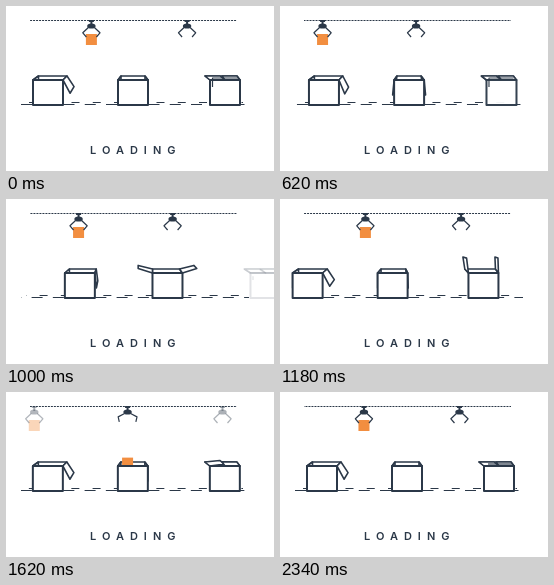
An HTML page with a canvas for the animation above (2360 ms loop, 268x165 px).

```html
<!DOCTYPE html>
<html lang="en">
<head>
<meta charset="utf-8">
<title>Loading</title>
<style>
  html, body { margin: 0; width: 100%; height: 100%; overflow: hidden; background: #fff; }
  canvas { position: absolute; left: 0; top: 0; width: 268px; height: 165px; }
  p {
    position: absolute; left: 84px; top: 136px; margin: 0;
    font: 600 11px/16px Inter, Lato, sans-serif;
    letter-spacing: 6px; white-space: nowrap; color: #2b3848;
  }
</style>
</head>
<body>
<canvas></canvas>
<p>LOADING</p>
<script>
const LOOP = 2360, CYCLE = LOOP / 2;
const INK = '#2b3848', ORANGE = '#f28e40';
const canvas = document.querySelector('canvas');
const ctx = canvas.getContext('2d');
const scale = window.devicePixelRatio || 1;
canvas.width = 268 * scale;
canvas.height = 165 * scale;

const clamp = v => Math.max(0, Math.min(1, v));
const mix = (a, b, u) => a + (b - a) * u;
const ramp = (t, a, b) => clamp((t - a) / (b - a));

// Piecewise linear value through [time, value] pairs
function track(t, keys) {
  let i = 1;
  while (i < keys.length - 1 && t > keys[i][0]) i++;
  const [t0, v0] = keys[i - 1], [t1, v1] = keys[i];
  return mix(v0, v1, ramp(t, t0, t1));
}

// cubic-bezier(.8, 0, .2, 1), solved by bisection
function glide(x) {
  if (x <= 0 || x >= 1) return clamp(x);
  let lo = 0, hi = 1, s;
  for (let i = 0; i < 24; i++) {
    s = (lo + hi) / 2;
    const r = 1 - s;
    if (2.4 * s * r * r + 0.6 * s * s * r + s * s * s < x) lo = s; else hi = s;
  }
  return s * s * (3 - 2 * s);
}

function shape(points, width, fill, closed = true) {
  ctx.beginPath();
  points.forEach(([x, y]) => ctx.lineTo(x, y));
  if (closed) ctx.closePath();
  if (fill) { ctx.fillStyle = fill; ctx.fill(); }
  ctx.lineWidth = width;
  ctx.stroke();
}

function dashes(x0, x1, y, width, pattern, shift) {
  ctx.setLineDash(pattern);
  ctx.lineDashOffset = -shift;
  shape([[x0, y], [x1, y]], width, null, false);
  ctx.setLineDash([]);
}

/* Boxes: each moves one slot to the right per loop */
const SLOT = [-58, 27, 112, 204, 312];
const BACK_LEFT = [8, 5.5, 3, -5, -8];
const BACK_RIGHT = [38, 34, 27, 27, 22];
const TOP = 74, BACK = 70, WIDE = 30, FLAP = 15;

// Flap angles in degrees: 90 hangs down, 0 points outwards, -180 is shut
const RIGHT = [
  [[0, 62], [LOOP, 62]],
  [[500, 62], [1000, 84], [1300, 90]],
  [[600, 90], [1000, -17], [1360, -166], [1640, -180]],
  [[0, -180], [LOOP, -180]]
];
const LEFT = [
  [[0, 90], [LOOP, 90]],
  [[0, 90], [LOOP, 90]],
  [[600, 90], [1000, -17], [1360, -148], [1700, -180]],
  [[0, -180], [LOOP, -180]]
];

function makeBox(k, t, e) {
  const at = list => mix(list[k], list[k + 1], e);
  return {
    x: at(SLOT), bl: at(BACK_LEFT), br: at(BACK_RIGHT),
    left: track(t, LEFT[k]), right: track(t, RIGHT[k]),
    tape: k === 3 ? 1 : k === 2 ? ramp(t, 1700, 2340) : 0,
    alpha: k === 0 ? clamp((e - 0.4) * 2.5) : k === 3 ? clamp(1 - 2.3 * e) : 1
  };
}

function flap(front, back, side, angle) {
  const a = angle * Math.PI / 180;
  const dx = side * FLAP * Math.cos(a), dy = FLAP * Math.sin(a);
  shape([[front, TOP], [back, BACK], [back + dx, BACK + dy * 0.8], [front + dx, TOP + dy]], 1.6, '#fff');
}

function drawLid(b) {
  ctx.globalAlpha = b.alpha;
  shape([[b.x, TOP], [b.x + b.bl, BACK], [b.x + b.br, BACK], [b.x + WIDE, TOP]], 1.6, '#fff');
  flap(b.x, b.x + b.bl, -1, b.left);
  flap(b.x + WIDE, b.x + b.br, 1, b.right);
}

function drawBody(b) {
  const { x } = b;
  ctx.globalAlpha = b.alpha;
  shape([[x, TOP], [x + WIDE, TOP], [x + WIDE, 99], [x, 99]], 2, '#fff');
  if (b.tape) {
    ctx.setLineDash([36 * b.tape, 60]);
    shape([[x + 29, 72], [x + 2.5, 72], [x + 2.5, 81]], 1.2, null, false);
    ctx.setLineDash([]);
  }
}

/* Claws: a new one enters every half loop */
const PATH = [[0, -7], [500, 33], [1000, 72.5], [1180, 85.3], [1360, 102.2],
  [1440, 107], [1800, 136], [2360, 181], [3540, 276]];
const DROP = CYCLE + 90;

function drawClaw(age, x) {
  const open = track(age, [[DROP - 20, 0], [DROP + 80, 1], [DROP + 260, 1], [DROP + 480, 0]]);
  ctx.globalAlpha = ramp(x, 25, 34) * (1 - ramp(x, 208, 222));
  ctx.fillStyle = INK;
  ctx.fillRect(x - 2.5, 14, 5, 2);
  ctx.fillRect(x - 1, 15, 2, 4);
  ctx.beginPath();
  ctx.ellipse(x, 20, 4.2, 2.6, 0, 0, 7);
  ctx.fill();
  for (const s of [-1, 1]) {
    shape([
      [x + s * 3, 21.5],
      [x + s * mix(8.6, 10, open), mix(26.8, 23.5, open)],
      [x + s * mix(5, 10.6, open), mix(31, 29, open)]
    ], 1.2, null, false);
  }
}

function drawBlock(age, x) {
  const d = Math.max(0, age - DROP);
  const y = 28 + 2e-4 * d * d + 3e-7 * d ** 3;
  if (y > 78) return;
  ctx.globalAlpha = ramp(x, 25, 34);
  ctx.fillStyle = ORANGE;
  ctx.fillRect(x - 5.5, y, 11, 11);
}

function draw(now) {
  const t = now % LOOP;
  const e = glide((t - 378) / 1317);
  ctx.setTransform(scale, 0, 0, scale, 0, 0);
  ctx.globalAlpha = 1;
  ctx.clearRect(0, 0, 268, 165);
  ctx.strokeStyle = INK;
  ctx.lineJoin = 'round';

  dashes(24, 231, 14.5, 1, [2, 1], t * 192 / LOOP);
  dashes(20, 237, 96.5, 1, [8, 13.25], e * 85 + 3);
  dashes(15, 243, 98.5, 1, [11, 10.25], e * 85);

  const boxes = [0, 1, 2, 3].map(k => makeBox(k, t, e));
  const claws = [0, 1, 2].map(j => {
    const age = t % CYCLE + j * CYCLE;
    return [age, track(age, PATH)];
  });
  boxes.forEach(drawLid);
  claws.forEach(c => drawBlock(...c));
  boxes.forEach(drawBody);
  claws.forEach(c => drawClaw(...c));
}

function frame() {
  draw(performance.now());
  requestAnimationFrame(frame);
}
frame();
</script>
</body>
</html>
```
